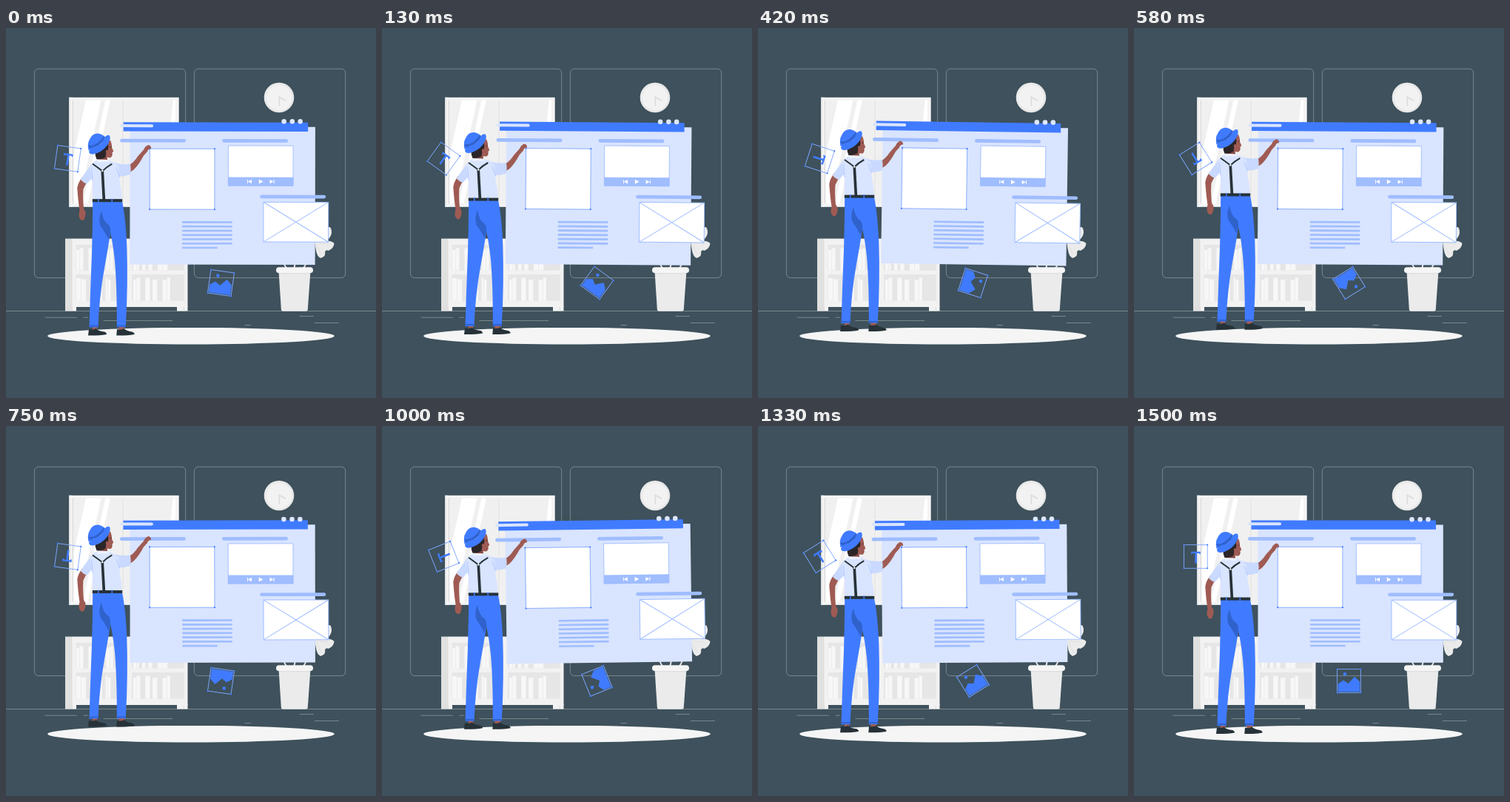
Write an HTML page with a canvas that moves like this. It is 500 by 500 pixels and loops after 1540 ms.

```html
<!DOCTYPE html>
<html lang="en">
<head>
<meta charset="utf-8">
<title>Designer at a floating layout</title>
<style>
html, body { margin: 0; width: 100%; height: 100%; overflow: hidden; background: #3e515c; }
canvas { display: block; width: 500px; height: 500px; }
</style>
</head>
<body>
<canvas id="stage"></canvas>
<script>
const LOOP = 1540, CYCLE = 1500, SIZE = 500;
const BLUE = '#407bff', MID = '#9fbdff', PALE = '#d9e4ff', DEEP = '#3062cc';
const INK = '#263238', SKIN = '#9f5b53';
const canvas = document.getElementById('stage');
const ctx = canvas.getContext('2d');
const ratio = window.devicePixelRatio || 1;
canvas.width = canvas.height = SIZE * ratio;

function fill(d, color) {
  ctx.fillStyle = color;
  ctx.fill(new Path2D(d));
}
function line(d, color, width = 1) {
  ctx.strokeStyle = color;
  ctx.lineWidth = width;
  ctx.stroke(new Path2D(d));
}
function rect(x, y, w, h, color) {
  ctx.fillStyle = color;
  ctx.fillRect(x, y, w, h);
}
function round(x, y, w, h, color, r = h / 2) {
  ctx.fillStyle = color;
  ctx.beginPath();
  ctx.roundRect(x, y, w, h, r);
  ctx.fill();
}
function oval(x, y, rx, color, ry = rx, turn = 0) {
  ctx.fillStyle = color;
  ctx.beginPath();
  ctx.ellipse(x, y, rx, ry, turn, 0, Math.PI * 2);
  ctx.fill();
}
function outline(x, y, w, h, color, width) {
  ctx.strokeStyle = color;
  ctx.lineWidth = width;
  ctx.strokeRect(x, y, w, h);
}
function handles(x, y, w, h) {
  for (const px of [x, x + w])
    for (const py of [y, y + h]) oval(px, py, 1.1, BLUE);
}
function turned(x, y, degrees, draw) {
  ctx.save();
  ctx.translate(x, y);
  ctx.rotate(degrees * Math.PI / 180);
  ctx.translate(-x, -y);
  draw();
  ctx.restore();
}

function drawWalls() {
  rect(0, 0, SIZE, SIZE, '#3e515c');
  ctx.strokeStyle = '#ebebeb';
  ctx.lineWidth = 0.35;
  for (const x of [38.4, 254.4]) {
    ctx.beginPath();
    ctx.roundRect(x, 55.2, 204.3, 282.4, 5.5);
    ctx.stroke();
  }
  const dashes = [[0, 382.4, 500], [416.8, 398.5, 33], [322.5, 401.2, 8.7],
    [396.6, 389.2, 19.2], [52.5, 390.9, 43.2], [104.6, 390.9, 6.3], [131.5, 395.1, 93.7]];
  for (const [x, y, w] of dashes) rect(x, y, w, 0.35, '#ebebeb');
}

function drawWindow() {
  rect(85, 93.8, 5, 148, '#e0e0e0');
  rect(86.5, 93.8, 147.2, 148, '#f5f5f5');
  rect(85, 93.8, 2, 148, '#e6e6e6');
  rect(89.5, 97.5, 2, 140, '#e0e0e0');
  rect(91.5, 97.5, 66, 140, '#f0f0f0');
  rect(159.5, 97.5, 70, 140, '#f0f0f0');
  rect(157.3, 97.5, 1.6, 140, '#e6e6e6');
  fill('M108 97.5H128.500L98 237.500H91.500V172Z', '#fff');
  fill('M134.500 97.500H141L110.500 237.500H104Z', '#fff');
  fill('M224 113L226 97.500H229V124L220 165Z', '#fff');
}

function drawBooks(left, right, floor, room, seed) {
  let x = left;
  for (let i = 0; x < right - 3; i++) {
    const noise = Math.abs(Math.sin((i + seed) * 12.9)) ;
    const w = Math.min(3 + noise * 4, right - x);
    const h = room * (0.82 + 0.18 * Math.abs(Math.cos((i + seed) * 4.7)));
    rect(x, floor - h, w - 0.6, h, i % 3 === 2 ? '#e6e6e6' : '#f7f7f7');
    x += w + (i % 4 === 3 ? 3 : 0);
  }
}

function drawShelf() {
  rect(80, 284.6, 10, 98, '#e0e0e0');
  rect(89.500, 284.6, 156, 92.400, '#f2f2f2');
  rect(90, 376, 5, 6.500, '#f2f2f2');
  rect(231, 376, 14.500, 6.500, '#f2f2f2');
  rect(239.500, 377, 1, 5.500, '#e0e0e0');
  for (const [top, h] of [[293, 34.5], [333, 35.500]]) {
    rect(94.500, top, 69, h, '#e6e6e6');
    rect(170, top, 71, h, '#e6e6e6');
    drawBooks(95, 160, top + h, h - 4, top);
    drawBooks(172, 230, top + h, h - 4, top + 7);
  }
}

function drawClock() {
  oval(369, 94, 20.3, '#e0e0e0');
  oval(368.5, 94, 19.3, '#ebebeb');
  oval(369.2, 94.2, 17, '#f2f2f2');
  line('M369.3 105.500V93.500L378 98.300', '#dcdcdc', 1.7);
}

function drawPlant() {
  fill('M417 288L436 269Q440 268 440 277Q439 284 432 288Q439 287 443.500 291Q443 298 435.500 301Q432 299 431 303Q433 308 425 311Q420 309 418.500 298Z', '#ebebeb');
  line('M417 288Q428 293 436 291M419 291L426 306', '#dcdcdc', 0.7);
  line('M375 317Q377 322 380 326M391 317L389 326M406 317Q404 322 401 326', '#e6e6e6', 2);
  fill('M368.500 328H411.500L407.800 380Q407.600 382.700 405 382.700H374.500Q372 382.700 371.800 380Z', '#ebebeb');
  rect(368.8, 330, 42.4, 2.3, '#dedede');
  round(365, 323.3, 50, 7.700, '#f5f5f5');
}

function drawScreen() {
  rect(167.500, 133.500, 250.300, 186.300, PALE);
  rect(158.500, 127.500, 249.500, 12.300, BLUE);
  round(154, 130.300, 45, 4, PALE);
  for (const x of [375.500, 386.700, 397.500]) oval(x, 126.200, 3.300, '#dde7ff');
  for (const [x, y] of [[154, 150], [292, 150], [343.200, 225.500]]) round(x, y, 89, 4.700, MID);

  rect(194.200, 163.300, 87.700, 81.900, '#fff');
  outline(194.200, 163.300, 87.700, 81.900, '#80a7ff', 0.9);
  handles(194.200, 163.300, 87.700, 81.900);

  rect(300.300, 159, 87.700, 54, '#fff');
  rect(300, 201.600, 88.300, 11.900, MID);
  outline(300.300, 159, 87.700, 54, MID, 0.9);
  fill('M326 205H327V210H326ZM332 204.800V210.200L327 207.500Z', '#fff');
  fill('M341.800 204.500V210.500L347.500 207.500Z', '#fff');
  fill('M356.500 204.800V210.200L361.500 207.500ZM361.700 205H362.700V210H361.700Z', '#fff');

  for (let i = 0; i < 7; i++) round(238, 261.200 + i * 5.760, i < 6 ? 67.800 : 47.800, 2.600, MID, 0.800);

  rect(348, 235.200, 87.700, 53.800, '#fff');
  outline(348, 235.200, 87.700, 53.800, MID, 1);
  line('M348 235.200L435.700 289M435.700 235.200L348 289', MID, 1);
}

function drawTextTile() {
  outline(67.500, 160.600, 31.700, 31.700, '#80a7ff', 0.9);
  handles(67.500, 160.600, 31.700, 31.700);
  fill('M77.300 169.700H89.800V173.200H88.600L88 172H84.900V185.500H82.300V172H79.100L78.500 173.200H77.300Z', BLUE);
}

function drawPictureTile() {
  outline(274.600, 328.600, 31.800, 31.800, '#80a7ff', 0.9);
  handles(274.600, 328.600, 31.800, 31.800);
  oval(285, 335.300, 2.300, BLUE);
  fill('M275.800 348.500L283 343.500L289.500 348L298 338.800L305.200 345.500V359.200H275.800Z', BLUE);
}

function drawLegs() {
  fill('M117 402H123V410H117ZM152.500 402H160V410H152.500Z', SKIN);
  fill('M112 407.500Q118 409 121.500 406.800Q126 410.500 133 411Q136 412 136 414.500Q126 416.300 111 416Z', INK);
  fill('M150 407.500Q156 409 159.500 406.800Q164 410.500 171 411.200Q174 412.500 173.500 414.500Q164 416.300 149.300 416Z', INK);
  fill('M117.200 235H157Q161.500 255 163.300 295Q165 345 161.800 404.800H149.800Q150 350 147 315Q144.500 292 141 277Q138 298 133 325Q126 364 124.500 405H112.500Q114 355 116 305Q117 270 117.200 235Z', BLUE);
  fill('M129 248Q124.500 258 127.500 268Q133 275 138.500 286L141 277Q141.500 270 139 267Q131 262 129 248Z', DEEP);
  line('M112.600 403H124.600M149.900 403H161.900', DEEP, 1.800);
}

function drawTorso() {
  fill('M103 202Q97 210 96.300 217Q97.500 235 99.500 247Q97.500 255 99.500 257.500Q101 261.500 105 260Q108 255 107.500 249L105 244.500Q103.500 228 104.500 218L110 207Z', SKIN);
  fill('M166 186Q173 182 178 174L186 165Q188 159.500 193 158.500Q196.500 160 196 163.500Q192 163.500 191 167.500L186 173Q179 186 172.500 192Q169 195 166 195Z', SKIN);
  fill('M124.500 179Q115 182 111 191Q105 198 100.800 205.500Q105 210 109 211L117 203Z', '#c9d9ff');
  fill('M143 181Q153 186 168 184Q169.500 191 167.800 198.500Q159 201.500 151 201Z', '#c9d9ff');
  fill('M123 178.500L140 179.500Q147 182 152 187L153.500 207Q156 219 157 233H117L116.800 207Q114 195 113.500 189Q116 182 123 178.500Z', PALE);
  line('M115.500 190L117 208M149 189L153.500 202', MID, 0.7);
  line('M117 184Q124 189 130.300 193.800Q136 188 143.300 184', INK, 2);
  fill('M128.400 192.500H132L134.200 232.500H130.500Z', INK);
  oval(130.300, 193.500, 1.200, '#fff');
  rect(116.800, 231.600, 40.400, 4, INK);
  for (const x of [124, 142.500]) rect(x, 231.200, 1.500, 4.800, BLUE);
}

function drawHead() {
  fill('M124 170H136L137 179Q132 183 123.500 180.500Z', '#874a43');
  fill('M133 158L141 152Q143.500 158 143 162L145.300 167Q144 168.500 143.500 169Q144 174 141.500 175.500Q137 176 134 174Z', SKIN);
  fill('M120.500 167L137 155L138.500 161L137.500 167Q134 171 135 174Q132 178 122.500 178Q120 173 120.500 167Z', '#2b2528');
  oval(136.700, 167.800, 1.900, SKIN, 2.500);
  line('M140.800 161.500L142.500 161', '#2b2528', 1);
  line('M141.200 171.800L143.500 171.500', '#7a3f3a', 0.800);
  fill('M122.500 178L136.500 178.500L139.500 181.500L123 182Z', '#edf2ff');
  fill('M111.500 166Q109.500 156 113 151Q116 144 122 143.200Q125 142.400 128 144Q133 145.500 134 150Z', BLUE);
  fill('M110.800 159Q121 162 132.500 146.500L136 150L116 167Z', DEEP);
  fill('M112 167.500Q113 161.500 122 160.200Q130 158 133 148.500Q137 144 140 145.800Q142.500 151 136.500 159.500Q129 169 118 171Q112.500 171.500 112 167.500Z', BLUE);
}

// Triangle sway: 0, +1 at a quarter, -1 at three quarters, back to 0.
function sway(p) {
  return p < 0.25 ? p * 4 : p < 0.75 ? 2 - p * 4 : p * 4 - 4;
}

// The clip advances 24 times a second, on time rounded to 60ths.
function progress(ms) {
  const step = Math.floor((Math.floor(ms / 10) + 0.49) * 0.24);
  return Math.min((Math.floor(step * 2.5) + 2) * 1000 / 60, CYCLE) / CYCLE;
}

function render(ms) {
  const p = progress(ms);
  ctx.setTransform(ratio, 0, 0, ratio, 0, 0);
  drawWalls();
  drawWindow();
  drawShelf();
  drawClock();
  drawPlant();
  oval(250, 416.200, 193.900, '#f5f5f5', 11.300);
  turned(295, 221.500, sway(p), drawScreen);
  turned(83.350, 176.450, p * 360, drawTextTile);
  turned(290.500, 344.500, p * 360, drawPictureTile);
  ctx.save();
  ctx.translate(0, -10 * (1 - Math.abs(1 - 2 * p)));
  drawLegs();
  drawTorso();
  drawHead();
  ctx.restore();
}

let start;
function tick(now) {
  start ??= now;
  render((now - start) % LOOP);
  requestAnimationFrame(tick);
}
render(0);
requestAnimationFrame(tick);
</script>
</body>
</html>
```
